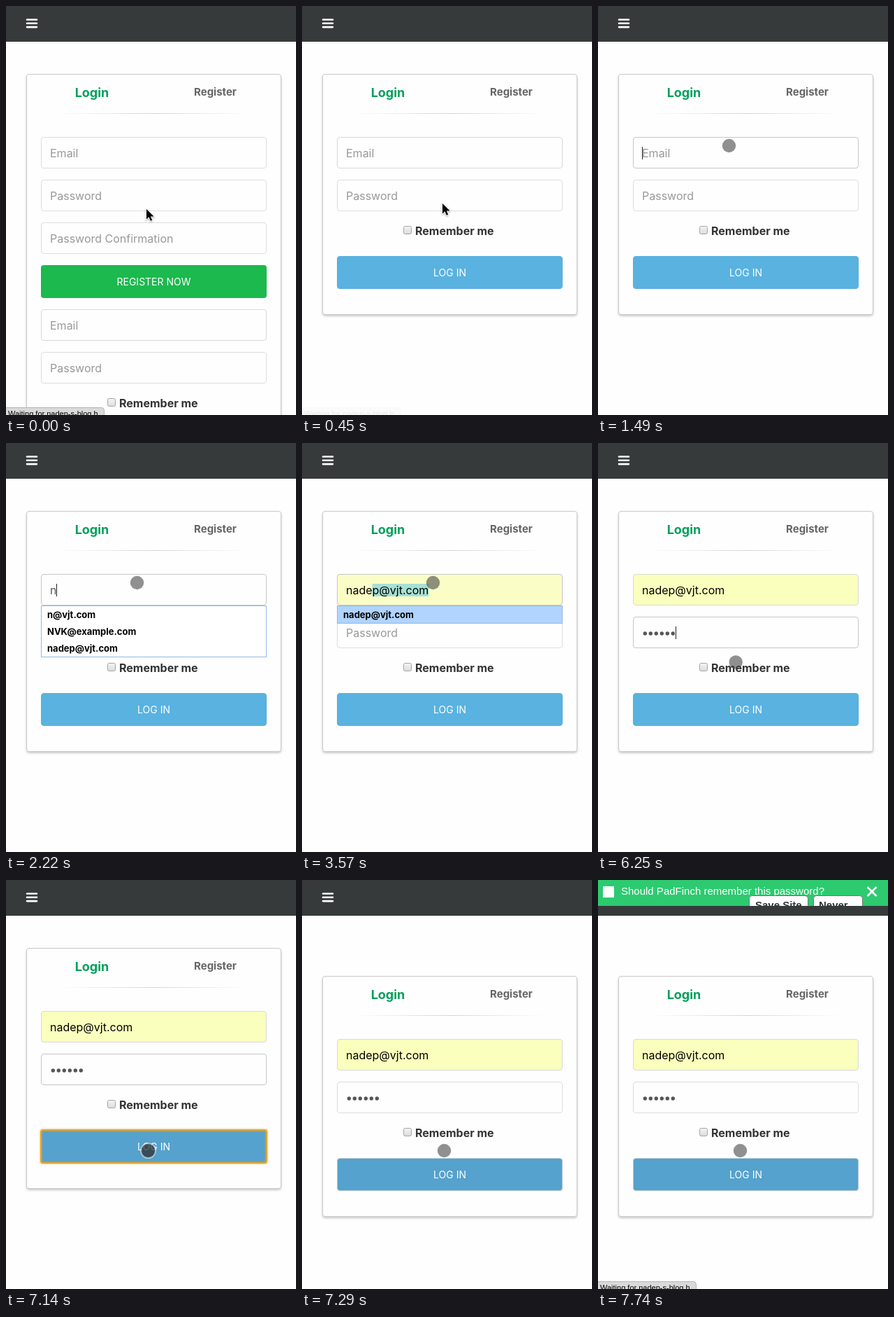
Animation of 415 by 584 pixels, one loop 8 s. Source, as an HTML page:

```html
<!DOCTYPE html>
<html lang="en">
<head>
<meta charset="utf-8">
<title>Login form</title>
<style>
  html, body { margin: 0; width: 100%; height: 100%; overflow: hidden; background: #fefefe; }
  svg { display: block; font: 16px Inter, sans-serif; }
  text { white-space: pre; }
  .card { fill: #fefefe; stroke: #c8c8c8; filter: drop-shadow(0 2px 1.5px rgba(0,0,0,.2)); }
  .field { fill: #fefefe; stroke: #ddd; }
  .hint { fill: #999; }
  .button { font-size: 14px; fill: #fff; text-anchor: middle; }
  .list text { font-size: 13px; font-weight: 700; }
  .arial { font-family: "Liberation Sans", Arial, sans-serif; }
  .ring { fill: none; stroke: #e5a52f; stroke-width: 2; filter: drop-shadow(0 0 1.5px #e5a52f); }
</style>
</head>
<body>
<svg width="415" height="584" viewBox="0 0 415 584">
  <defs>
    <linearGradient id="rule">
      <stop stop-opacity="0"/><stop offset=".5" stop-opacity=".16"/><stop offset="1" stop-opacity="0"/>
    </linearGradient>
    <linearGradient id="check" x2="0" y2="1">
      <stop stop-color="#f4f4f4"/><stop offset="1" stop-color="#dcdcdc"/>
    </linearGradient>
    <clipPath id="barClip"><rect width="415" height="37"/></clipPath>
    <clipPath id="statusClip"><rect y="570" width="141" height="14"/></clipPath>
  </defs>
  <rect width="415" height="584" fill="#fefefe"/>
  <rect width="415" height="51" fill="#363a3b"/>
  <path d="M30 19.5H44M30 24.8H44M30 30.1H44" stroke="#fff" stroke-width="2.6" stroke-linecap="round"/>

  <g id="page">
    <rect id="card" class="card" x="29.5" y="97.5" width="364" rx="3.5"/>
    <g font-weight="700" text-anchor="middle">
      <text x="123" y="130" font-size="18" fill="#029f5b">Login</text>
      <text x="299.5" y="128" font-size="15" fill="#666">Register</text>
    </g>
    <rect x="74" y="153" width="275" height="1" fill="url(#rule)"/>

    <g id="register">
      <rect class="field" x="50.5" y="187.5" width="322" height="44" rx="3.5"/>
      <rect class="field" x="50.5" y="248.5" width="322" height="44" rx="3.5"/>
      <rect class="field" x="50.5" y="309.5" width="322" height="44" rx="3.5"/>
      <text class="hint" x="63" y="216">Email</text>
      <text class="hint" x="63" y="277">Password</text>
      <text class="hint" x="63" y="338">Password Confirmation</text>
      <rect x="50" y="370" width="323" height="47" rx="4" fill="#1cb94e"/>
      <text class="button" x="211.5" y="399">REGISTER NOW</text>
    </g>

    <g id="login">
      <rect id="emailBox" class="field" x="50.5" y="187.5" width="322" height="44" rx="3.5"/>
      <rect id="passBox" class="field" x="50.5" y="248.5" width="322" height="44" rx="3.5"/>
      <text id="emailHint" class="hint" x="63" y="216">Email</text>
      <text id="passHint" class="hint" x="63" y="277">Password</text>
      <rect id="selection" y="201" height="18" fill="#a6e0d5"/>
      <text id="email" x="63" y="216"></text>
      <g id="dots" fill="#555"></g>
      <rect id="caret" width="1" height="18" fill="#222"/>
      <rect x="145.5" y="314.5" width="11" height="11" rx="2" fill="url(#check)" stroke="#a4a4a4"/>
      <text x="162" y="327" font-weight="700" fill="#333">Remember me</text>
      <rect id="submit" x="50.5" y="357.5" width="322" height="46" rx="3.5"/>
      <rect id="ring" class="ring" x="50" y="357" width="323" height="47" rx="3"/>
      <text class="button" x="211.5" y="386">LOG IN</text>
      <g id="list" class="list">
        <rect id="listBox" x="50.5" y="232.5" width="322" stroke="#94b9e4"/>
        <text id="item0" x="59" y="250"></text>
        <text id="item1" x="59" y="274">NVK@example.com</text>
        <text id="item2" x="59" y="298"></text>
      </g>
    </g>
  </g>

  <g id="bar" class="arial" clip-path="url(#barClip)">
    <rect width="415" height="37" fill="#2dca70"/>
    <g id="barContent" font-size="15">
      <rect x="7" y="9" width="16" height="16" fill="#fff"/>
      <text x="33" y="21" fill="#fff">Should PadFinch remember this password?</text>
      <g fill="#fff" stroke="#777">
        <rect x="216.5" y="22.5" width="84" height="26" rx="4"/>
        <rect x="308.5" y="22.5" width="70" height="26" rx="4"/>
      </g>
      <g font-weight="700" fill="#333">
        <text x="225" y="41">Save Site</text>
        <text x="316" y="41">Never...</text>
      </g>
      <path d="M385.5 10L398.5 23M398.5 10L385.5 23" stroke="#fff" stroke-width="2.6"/>
    </g>
  </g>

  <g id="status" class="arial" clip-path="url(#statusClip)" font-size="11">
    <rect x="-5.5" y="573.5" width="146" height="20" rx="4" fill="#dadada" stroke="#b5b5b5"/>
    <text id="statusText" x="3" y="585.5"></text>
  </g>

  <path id="arrow" d="M0 0V14.5L3.5 11.3L5.8 16.8L8.2 15.8L5.9 10.4H10.6Z" stroke="#fff" paint-order="stroke"
    stroke-width="1.6" style="filter:drop-shadow(0 1px 1px rgba(0,0,0,.35))"/>
  <circle id="touch"/>
</svg>
<script>
const LOOP = 8000;
const USER = "nadep", MAIL = USER + "@vjt.com";
const $ = id => document.getElementById(id);
const set = (id, attrs) => { for (const k in attrs) $(id).setAttribute(k, attrs[k]); };
const show = (id, on) => set(id, { visibility: on ? "inherit" : "hidden" });
const within = (t, a, b) => t >= a && t < b;
// Value of the last [time, value] pair already reached
const step = (t, pairs) => pairs.reduce((v, [at, next]) => t >= at ? next : v, pairs[0][1]);

$("item0").textContent = MAIL[0] + "@vjt.com";
$("item2").textContent = MAIL;
$("statusText").textContent = `Waiting for ${USER}-s-blog.h`;
for (let i = 0; i < 6; i++)
  $("dots").innerHTML += `<circle id="dot${i}" cx="${67.3 + 8 * i}" cy="272" r="2.7"/>`;

function drawEmail(t) {
  const length = step(t, [[0, 0], [1930, 1], [2370, 2], [2520, 4], [3570, MAIL.length]]);
  const filled = t >= 3570, email = $("email");
  email.textContent = MAIL.slice(0, length);
  set("email", { fill: filled ? "#000" : "#555" });
  show("emailHint", !length);
  set("emailBox", {
    style: `fill:${filled ? t < 3720 ? "#fbfdc6" : "#faffbd" : "#fefefe"};stroke:${within(t, 1190, 3870) ? "#c6c6c6" : "#d9d9d9"}`
  });

  const selecting = within(t, 3570, 3720);
  show("selection", selecting);
  if (selecting) {
    const start = email.getSubStringLength(0, 4);
    set("selection", { x: 63 + start, width: email.getComputedTextLength() - start });
  }
  return length ? email.getComputedTextLength() : 0;
}

function drawList(t) {
  const many = t < 2370;
  show("list", within(t, 2070, 3720));
  set("listBox", { height: many ? 73 : 25, fill: t < 3570 ? "#fff" : "#b0d4fd" });
  $("item0").textContent = many ? MAIL[0] + "@vjt.com" : MAIL;
  show("item1", many && within(t, 2070, 3720));
  show("item2", many && within(t, 2070, 3720));
}

function drawPassword(t) {
  const count = step(t, [[0, 0], [4470, 1], [4620, 2], [4760, 3], [5060, 4], [5360, 5], [5650, 6]]);
  for (let i = 0; i < 6; i++) show("dot" + i, i < count);
  show("passHint", !count);
  set("passBox", { style: `stroke:${within(t, 3870, 7290) ? "#c6c6c6" : "#ddd"}` });
  return count;
}

function drawPointer(t) {
  const [x, y] = step(t, [[0, [201, 290]], [300, [201, 287]], [450, [201, 282]], [600, [194, 235]], [750, [188, 198]]]);
  show("arrow", t < 1190);
  set("arrow", { transform: `translate(${x} ${y})` });

  const k = Math.min(7, Math.max(0, Math.floor((t - 5650) / 150))) / 7;
  const ease = k * k * (3 - 2 * k);
  const pressed = within(t, 1190, 1490) || within(t, 6840, 7290);
  show("touch", t >= 1190);
  set("touch", {
    cx: 187.5 + 16 * ease, cy: 199.5 + 187 * ease, r: pressed ? 10.5 : 9.7,
    fill: pressed ? "rgba(45,45,45,.72)" : "rgba(64,64,64,.58)",
    stroke: pressed ? "rgba(255,255,255,.5)" : "none", "stroke-width": 2
  });
}

function draw(t) {
  const first = t < 150, shifted = t >= 7290, active = t >= 7140;
  set("page", { transform: `translate(0 ${shifted ? 40 : 0})` });
  set("login", { transform: `translate(0 ${first ? 246 : 0})` });
  set("card", { height: first ? 700 : 343 });
  show("register", first);

  const emailWidth = drawEmail(t);
  drawList(t);
  const count = drawPassword(t);
  const inPassword = t >= 3870;
  show("caret", within(t, 1490, 3120) || within(t, 3720, 6700));
  set("caret", inPassword ? { x: 63 + 8 * count, y: 262 } : { x: 63 + Math.round(emailWidth), y: 201 });

  set("submit", {
    fill: active ? "#54a2cd" : "#59b2e0",
    stroke: shifted ? "#b9c9d2" : active ? "#54a2cd" : "#59b2e0"
  });
  show("ring", within(t, 7140, 7290));

  show("bar", t >= 7590);
  show("barContent", t >= 7740);
  set("status", { opacity: step(t, [[0, 1], [150, .65], [300, .3], [450, .08], [600, 0], [7590, 1]]) });
  drawPointer(t);
}

const origin = performance.now();
function tick() {
  draw((performance.now() - origin) % LOOP);
  requestAnimationFrame(tick);
}
tick();
</script>
</body>
</html>
```
